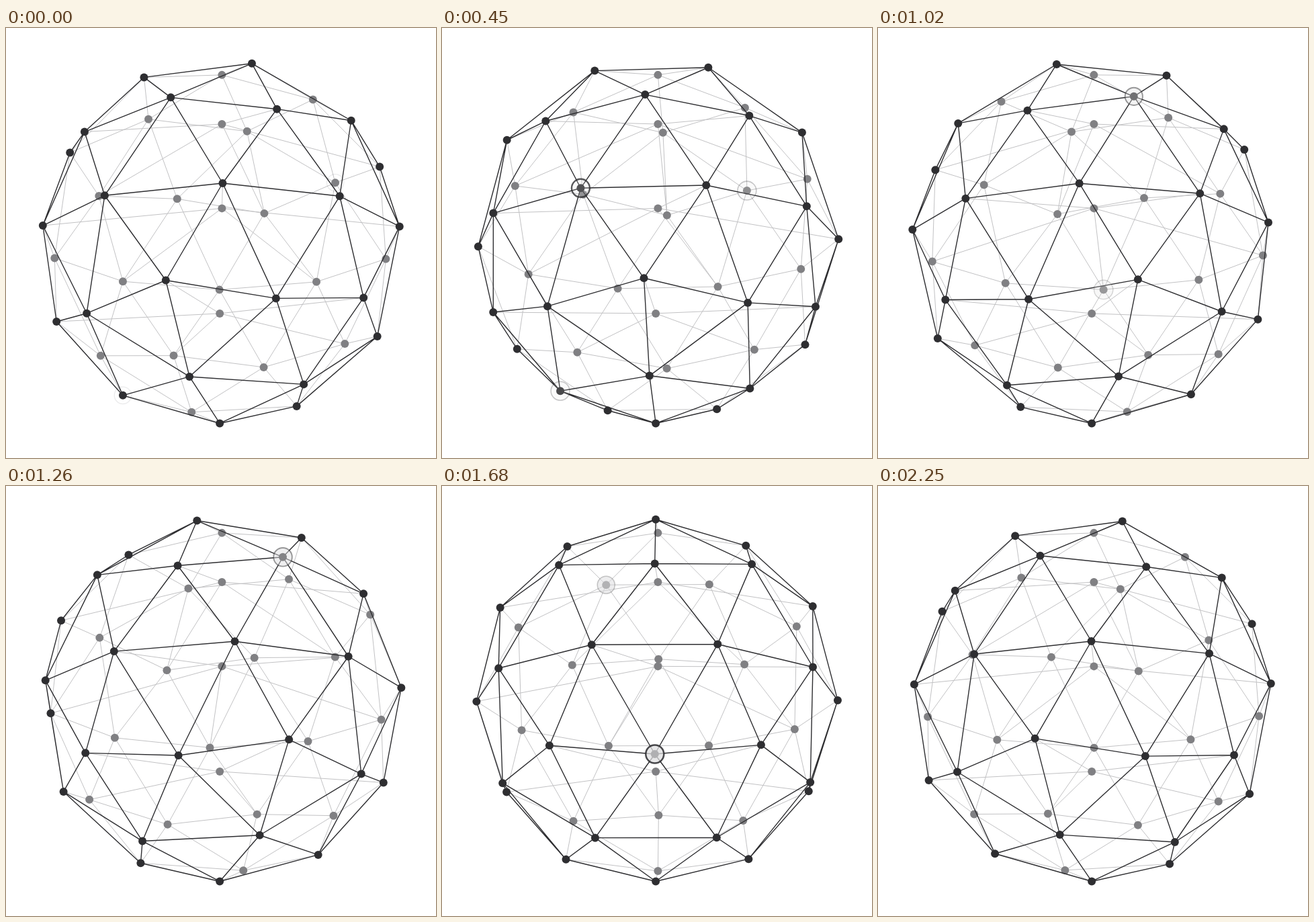
Write an HTML page with a canvas that moves like this. It is 640 px wide and 640 px high and loops after 2.28 s.

```html
<!DOCTYPE html>
<html lang="en">
<head>
<meta charset="utf-8">
<title>Rotating geodesic sphere</title>
<style>
  html, body { margin: 0; width: 100%; height: 100%; overflow: hidden; background: #fff; }
  canvas { display: block; width: 640px; height: 640px; }
</style>
</head>
<body>
<canvas id="stage" width="640" height="640"></canvas>
<script>
const ctx = document.getElementById('stage').getContext('2d');
const LOOP = 2280, HOLD = 30, STEP = 72, START = 18.5;
const CX = 319.8, CY = 319.8, RX = 268.8, RY = 270.5, CAM = 8;
const RAD = Math.PI / 180, TILT = 16.8 * RAD;
const SIN = Math.sin(TILT), COS = Math.cos(TILT);
const DARK = '#2e2e31', GREY = '#808083', PALE = '#c2c2c4';

const add = (p, q) => p.map((v, i) => v + q[i]);
const sub = (p, q) => p.map((v, i) => v - q[i]);
const dot = (p, q) => p[0] * q[0] + p[1] * q[1] + p[2] * q[2];
const cross = (p, q) => [
  p[1] * q[2] - p[2] * q[1],
  p[2] * q[0] - p[0] * q[2],
  p[0] * q[1] - p[1] * q[0]
];
const gap = (p, q) => Math.hypot(...sub(p, q));
const unit = p => p.map(v => v / Math.hypot(...p));
const onSphere = (lat, lon) => [
  Math.cos(lat * RAD) * Math.sin(lon * RAD),
  Math.sin(lat * RAD),
  Math.cos(lat * RAD) * Math.cos(lon * RAD)
];

// Every pair of points closer than the limit
function pairs(list, limit) {
  const found = [];
  list.forEach((p, i) => {
    for (let j = i + 1; j < list.length; j++) if (gap(p, list[j]) < limit) found.push([i, j]);
  });
  return found;
}

// Icosahedron standing on a corner, then split once
const BELT = Math.atan(0.5) / RAD;
const points = [[0, 1, 0], [0, -1, 0]];
for (let k = 0; k < 5; k++) {
  points.push(onSphere(BELT, 72 * k), onSphere(-BELT, 72 * k + 36));
}
points.push(...pairs(points, 1.2).map(([i, j]) => unit(add(points[i], points[j]))));
const edges = pairs(points, 0.7);

const linked = new Map(edges.map(([i, j], e) => [i * 100 + j, e]));
const faces = [];
for (const [i, j] of edges) {
  for (let k = j + 1; k < points.length; k++) {
    const sides = [i * 100 + j, i * 100 + k, j * 100 + k].map(key => linked.get(key));
    if (!sides.includes(undefined)) faces.push({ corners: [i, j, k], sides });
  }
}

function nearest(lat, lon) {
  const p = onSphere(lat, lon);
  return points.reduce((best, q, i) => gap(p, q) < gap(p, points[best]) ? i : best, 0);
}

// Hubs on the axis, each with five spokes to one belt
const spokes = [];
function addHub(height, lat, lon) {
  const ends = [0, 1, 2, 3, 4].map(k => nearest(lat, lon + 72 * k));
  const hub = points.push([0, height, 0]) - 1;
  ends.forEach(end => spokes.push([hub, end]));
}
addHub(0.7, BELT, 0);
addHub(0.2, 0, -18);
addHub(-0.4, -BELT, 36);

// The axis leans a little to the right
for (const p of points) {
  if (Math.hypot(p[0], p[2]) < 0.01) p[0] = 0.006 * Math.sign(p[1]);
}

const PULSE = 700;
const pulse = (lat, lon, start) => ({ id: nearest(lat, lon), start });
const pulses = [
  pulse(-58, -108, -60),
  pulse(32, 108, -60),
  pulse(0, -54, 110),
  pulse(0, 126, 450),
  pulse(32, -36, 800),
  pulse(-32, -72, 1330),
  pulse(58, 144, 1500)
];

function place([x, y, z], turn) {
  if (Math.hypot(x, z) > 0.01) {
    const c = Math.cos(turn), s = Math.sin(turn);
    [x, z] = [x * c + z * s, z * c - x * s];
  } 
  return [x, z * SIN + y * COS, z * COS - y * SIN];
}

function project([x, y, z]) {
  const s = 1 / (1 - z / CAM);
  return [CX + x * s * RX, CY - y * s * RY];
}

function drawLines(list, at, color, width) {
  ctx.strokeStyle = color;
  ctx.lineWidth = width;
  ctx.beginPath();
  for (const [i, j] of list) {
    ctx.moveTo(...at[i]);
    ctx.lineTo(...at[j]);
  }
  ctx.stroke();
}

function disc([x, y], r, color) {
  ctx.fillStyle = color;
  ctx.beginPath();
  ctx.arc(x, y, r, 0, 2 * Math.PI);
  ctx.fill();
}

// Rings are stronger near the viewer; their veil thickens through the loop
function drawPulse({ id, start }, t, pos, at) {
  const p = (t - start) / PULSE;
  if (p <= 0 || p >= 1) return;
  const swell = Math.sin(Math.PI * p);
  const alpha = swell * Math.max(0.35, 0.9 * pos[id][2]);
  disc(at[id], 12.5 + 2 * p, `rgba(222,222,224,${swell * t / LOOP})`);
  ctx.strokeStyle = `rgba(46,46,49,${alpha})`;
  ctx.lineWidth = 1.2 + 1.5 * alpha;
  ctx.stroke();
}

function draw(t) {
  const turn = (START + STEP * Math.max(0, t - HOLD) / (LOOP - HOLD)) * RAD;
  const pos = points.map(p => place(p, turn));
  const at = pos.map(project);
  const frontEdges = new Set(), frontDots = new Set();

  for (const { corners, sides } of faces) {
    const [a, b, c] = corners.map(i => pos[i]);
    const n = cross(sub(b, a), sub(c, a));
    if (dot(n, sub([0, 0, CAM], a)) * dot(n, a) > 0) {
      sides.forEach(e => frontEdges.add(e));
      corners.forEach(i => frontDots.add(i));
    }
  }

  ctx.fillStyle = '#fff';
  ctx.fillRect(0, 0, 640, 640);
  drawLines(edges.filter((_, e) => !frontEdges.has(e)).concat(spokes), at, PALE, 1);
  at.forEach((p, i) => { if (!frontDots.has(i)) disc(p, 6, GREY); });
  drawLines(edges.filter((_, e) => frontEdges.has(e)), at, DARK, 1.4);
  frontDots.forEach(i => disc(at[i], 6, DARK));
  pulses.forEach(p => drawPulse(p, t, pos, at));
}

const begin = performance.now();
function tick() {
  draw((performance.now() - begin) % LOOP);
  requestAnimationFrame(tick);
}
tick();
</script>
</body>
</html>
```
